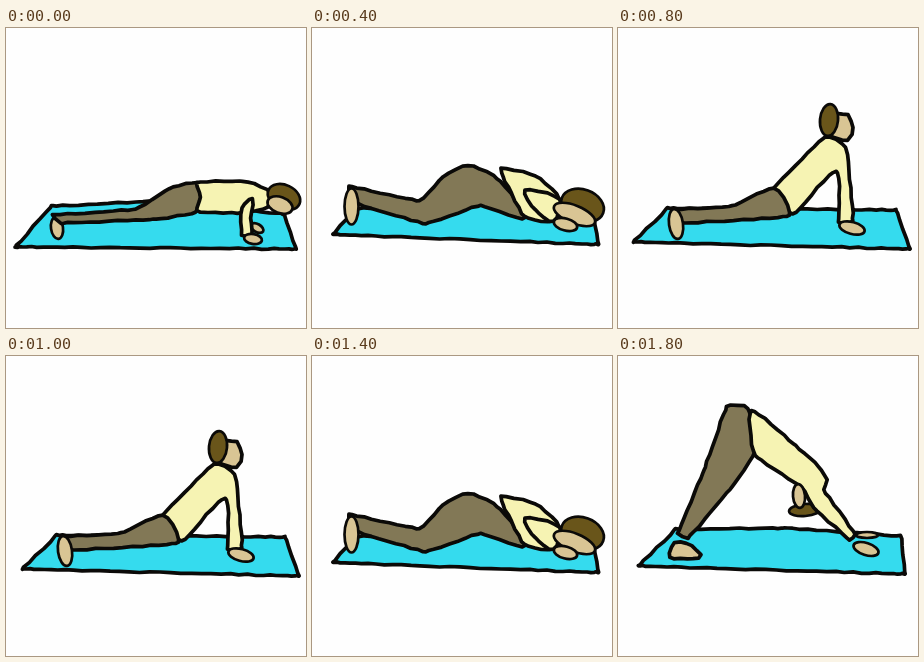
Animation, 300 px wide and 300 px high, one loop 2000 ms. Source, as an HTML page:

```html
<!DOCTYPE html>
<html lang="en">
<head>
<meta charset="utf-8">
<title>Yoga sequence</title>
<style>
html, body { margin: 0; width: 100%; height: 100%; overflow: hidden; background: #fefefe; }
svg { display: block; width: 100vw; height: 100vh; }
path, ellipse { stroke: #0b0a08; stroke-linejoin: round; }
path { stroke-width: 3.7; }
ellipse { stroke-width: 2.7; }
</style>
</head>
<body>
<svg id="stage" viewBox="0 0 300 300"></svg>
<script>
const MAT = '#35dbee', PANTS = '#827856', SHIRT = '#f6f3b3', SKIN = '#d9c594', HAIR = '#69551a';
const STEP = 200, WOBBLE = 0.6;

function seeded(seed) {
  return () => (seed = seed * 16807 % 2147483647) / 2147483647;
}

// Closed ink line through key points, with rounded corners and an unsteady hand.
function body(fill, keys, bend = 0.6) {
  const pts = keys.split(' ').map(s => s.split(',').map(Number));
  const n = pts.length, at = i => pts[(i + n) % n];
  const random = seeded(77), line = [];
  const dir = (a, b) => {
    const len = Math.hypot(b[0] - a[0], b[1] - a[1]);
    return [(b[0] - a[0]) / len, (b[1] - a[1]) / len];
  };
  for (let i = 0; i < n; i++) {
    const b = at(i), c = at(i + 1);
    const from = dir(at(i - 1), c), to = dir(b, at(i + 2));
    const len = Math.hypot(c[0] - b[0], c[1] - b[1]);
    const pull = bend * Math.min(len, 30), steps = Math.ceil(len / 7);
    for (let s = 0; s < steps; s++) {
      const t = s / steps, u = 1 - t;
      line.push(b.map((v, k) => (
        v * u * u * (1 + 2 * t) + c[k] * t * t * (1 + 2 * u) +
        pull * t * u * (u * from[k] - t * to[k]) +
        (random() * 2 - 1) * WOBBLE
      ).toFixed(1)));
    }
  }
  return `<path fill="${fill}" d="M${line.join('L')}Z"/>`;
}

const mat = keys => body(MAT, keys, 0);
const blob = (fill, x, y, rx, ry, turn) =>
  `<ellipse fill="${fill}" rx="${rx}" ry="${ry}" transform="translate(${x} ${y}) rotate(${turn})"/>`;
const shift = (x, y, art) => `<g transform="translate(${x} ${y})">${art}</g>`;

const plank =
  blob(SKIN, 51, 200, 6, 11, -8) +
  body(PANTS, '47,187 130,181 163,161 191,155 195,169 190,184 150,191 55,195') +
  blob(SKIN, 251, 200, 7, 4, 30) +
  body(SHIRT, '191,155 237,153 265,164 262,179 236,185 191,183 195,169') +
  body(SHIRT, '247,171 236,180 236,207 246,207 245,190') +
  blob(SKIN, 247, 211, 9, 5, 10) +
  blob(HAIR, 278, 169, 17, 12, 25) +
  blob(SKIN, 274, 177, 13, 8, 20);

const rest =
  mat('42,183 172,176 281,196 285,219 19,209') +
  body(PANTS, '36,161 106,175 130,151 155,140 184,153 212,192 167,180 112,198 44,178') +
  blob(SKIN, 38, 181, 7, 18, 0) +
  body(SHIRT, '188,143 222,150 246,173 239,195 211,191 190,152') +
  body(SHIRT, '212,165 246,173 240,196 222,184') +
  blob(HAIR, 269, 180, 22, 16, 20) +
  blob(SKIN, 261, 189, 22, 9, 22) +
  blob(SKIN, 252, 199, 12, 6, 15);

const cobra =
  mat('51,179 279,181 293,220 16,213') +
  body(SHIRT, '157,160 208,108 229,118 236,192 222,193 219,142 176,185') +
  body(PANTS, '56,181 115,177 157,159 172,187 62,194') +
  blob(SKIN, 59, 195, 7, 15, -8) +
  blob(SKIN, 235, 199, 13, 6, 15) +
  body(SKIN, '215,86 231,86 236,98 231,111 212,106') +
  blob(HAIR, 212, 91, 9, 16, 5);

const dog =
  mat('58,171 165,170 283,178 287,216 20,208') +
  blob(SKIN, 249, 177, 11, 3, 0) +
  body(PANTS, '109,49 130,50 137,94 114,129 70,180 60,175 86,112') +
  blob(HAIR, 187, 152, 16, 6, -5) +
  body(SHIRT, '134,53 178,88 201,108 209,122 206,132 237,176 232,182 196,150 184,130 137,97') +
  blob(SKIN, 181, 138, 6, 12, -5) +
  body(SKIN, '57,185 69,185 83,196 80,200 52,199') +
  blob(SKIN, 248, 191, 13, 6, 18);

const highRest = shift(1.5, -2.5, rest);

const poses = [
  mat('46,178 148,173 278,186 290,221 9,219') + plank,
  mat('51,170 149,168 281,182 292,216 9,209') + shift(1.5, -4.5, plank),
  highRest,
  rest,
  shift(-1, 1, cobra),
  cobra,
  rest,
  highRest,
  dog,
  shift(0, 2, dog)
];

const stage = document.getElementById('stage');
let shown = -1;

function draw(ms) {
  const i = Math.floor(ms / STEP) % poses.length;
  if (i === shown) return;
  shown = i;
  stage.innerHTML = poses[i];
}

const start = performance.now();
function tick() {
  draw(performance.now() - start);
  requestAnimationFrame(tick);
}
tick();
</script>
</body>
</html>
```
